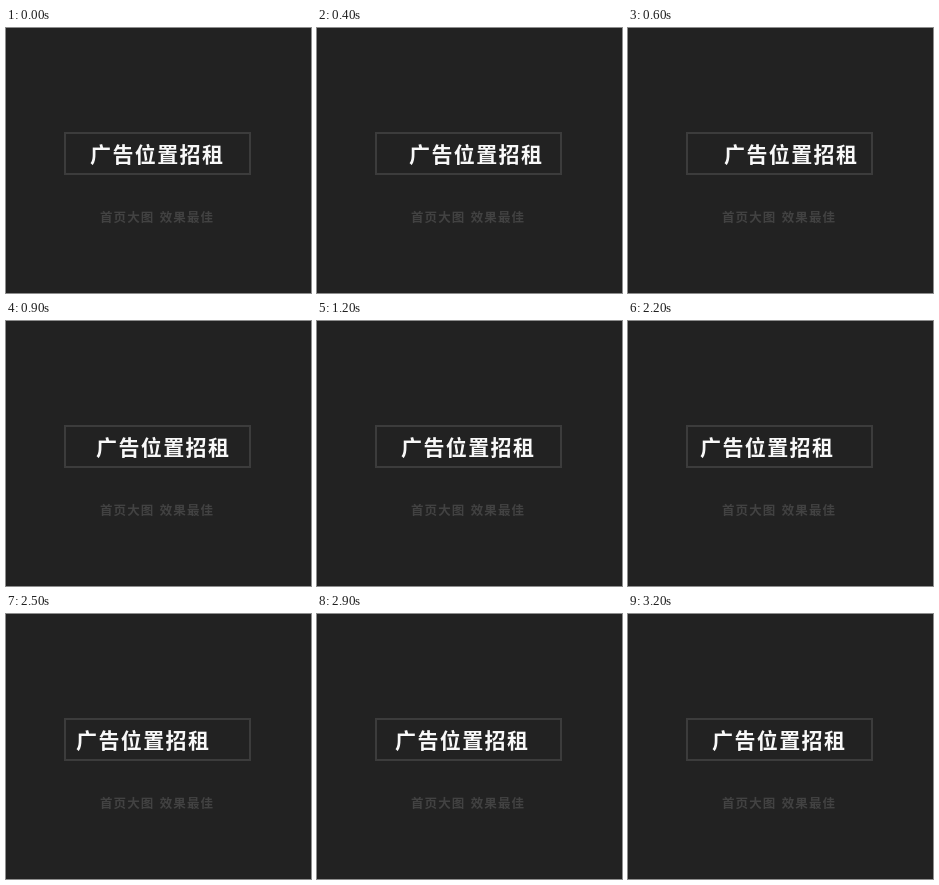
Recreate the animation shown at these times as an HTML page. Size 305 px wide and 265 px high, loop 3300 ms.

```html
<!DOCTYPE html>
<html lang="zh-CN">
<head>
<meta charset="utf-8">
<style>
  html, body { margin: 0; width: 100%; height: 100%; overflow: hidden; background: #222; }
  svg { display: block; }
  text { font-family: "Noto Sans CJK SC", "Noto Sans CJK", sans-serif; font-weight: 700; }
  #title { font-size: 21px; letter-spacing: 1.4px; fill: #f8f8f8; }
  #note { font-size: 12.5px; letter-spacing: 1.1px; word-spacing: 1.4px; fill: #424242; }
</style>
</head>
<body>
<svg width="305" height="265">
  <rect x="59" y="105" width="185" height="41" fill="none" stroke="#3c3c3c" stroke-width="2"/>
  <text id="title" x="84" y="134">广告位置招租</text>
  <text id="note" x="94" y="194">首页大图 效果最佳</text>
</svg>
<script>
  const title = document.getElementById('title');
  const STEP = 100, STEPS = 33;

  // Triangular swing: `peak` steps away from rest and back, starting at `start`
  const swing = (n, start, peak) => Math.max(0, peak - Math.abs(n - start - peak));

  function draw() {
    const n = Math.floor(performance.now() / STEP) % STEPS;
    const shift = 2 * (swing(n, 0, 6) - swing(n, 16, 8));
    title.setAttribute('x', 84 + shift);
    requestAnimationFrame(draw);
  }
  draw();
</script>
</body>
</html>
```
